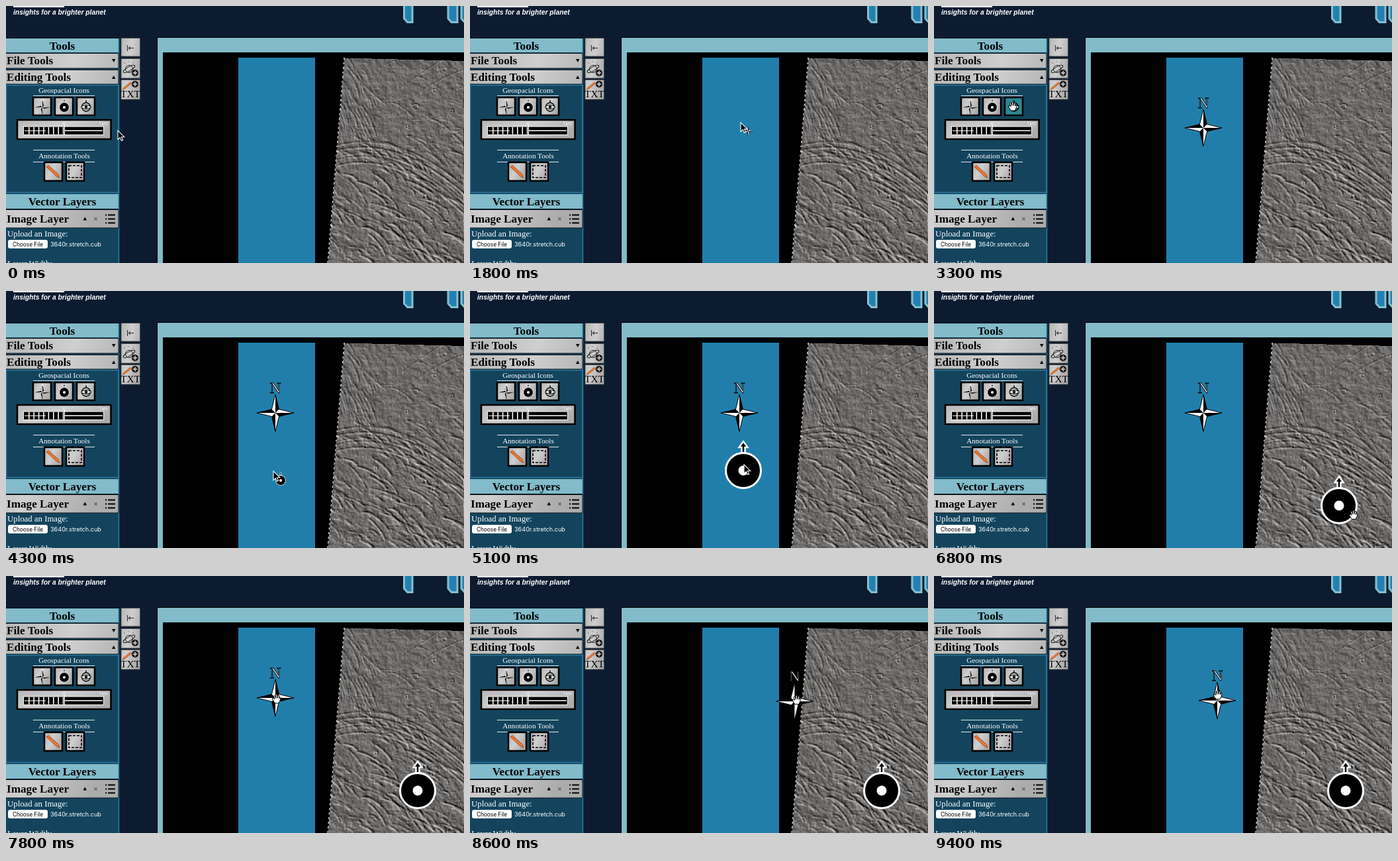
An HTML page with a canvas for the animation above (9.5 s loop, 692 px wide and 388 px high).

```html
<!DOCTYPE html>
<html lang="en">
<head>
<meta charset="utf-8">
<title>Map annotation demo</title>
<style>
  html, body { margin: 0; width: 100%; height: 100%; overflow: hidden; background: #0c1b30; }
  svg, canvas { position: absolute; left: 0; top: 0; }
  #land { left: 480px; top: 78px; }
  text { font: 11.2px "Liberation Serif", Times, serif; fill: #fff; }
  .head { font-weight: bold; font-size: 17.2px; fill: #000; }
  .mid { text-anchor: middle; }
  .form { font-size: 12.8px; }
  .sans { font: 9.1px Inter, "Liberation Sans", sans-serif; }
  .tag { font: italic bold 10.3px "Liberation Sans", Arial, sans-serif; }
  .bar { fill: url(#steel); stroke: #10161c; }
  .btn { fill: url(#steel); stroke: #000; stroke-width: 2.5; }
  .btn.on { fill: #2b8793; }
  .side { fill: url(#steel); stroke: #4d4d4d; }
</style>
</head>
<body>
<svg width="692" height="388">
  <defs>
    <linearGradient id="steel" x2="1" y2=".5">
      <stop stop-color="#b6b6b6"/><stop offset=".5" stop-color="#cfcfcf"/><stop offset="1" stop-color="#acacac"/>
    </linearGradient>
    <g id="star">
      <path d="M0-28L5.5-5.5 28 0 5.5 5.5 0 28-5.5 5.5-28 0-5.5-5.5z" fill="#fff" stroke="#000"/>
      <path d="M0 0V-28L5.5-5.5zH28L5.5 5.5zV28L-5.5 5.5zH-28L-5.5-5.5z"/>
    </g>
    <g id="north">
      <path d="M-2.5-26V-35H-6.5L0-44 6.5-35H2.5V-26z" stroke="#fff" stroke-width="2.4"/>
      <circle r="26.5" stroke="#fff" stroke-width="3"/>
      <circle r="7.5" fill="#fff"/>
    </g>
    <g id="plus">
      <circle r="5"/><path d="M-3.5 0H3.5M0-3.5V3.5" stroke="#ddd" stroke-width="1.5"/>
    </g>
    <path id="pencil" d="M-10-7L-7-9.500 8 4 10 9.500 5 7z" fill="#e8772e" stroke="#8a4a22" stroke-width=".8"/>
  </defs>

  <!-- banner -->
  <path d="M11-75h77v77h-77z" fill="#fff"/>
  <text class="tag" x="11" y="12.5">insights for a brighter planet</text>
  <g fill="#2481ae" stroke="#86c0d0" stroke-width="3">
    <path d="M601.500-3V19L606.500 24.500H614V-3zM668-3V19L673 24.500H682V-3zM688-3V19L693 24.500H700V-3z"/>
  </g>

  <!-- map frame -->
  <path d="M228 47H692V388H228z" fill="#000"/>
  <path d="M229 48H692V70H237V388H229z" fill="#82bbca"/>
  <path d="M351 78H467V388H351z" fill="#217eab"/>

  <!-- side panel -->
  <path d="M0 47H171V388H0z" fill="#14445d"/>
  <path d="M0 48H171M0 306.500H171" stroke="#081522" stroke-width="2"/>
  <path d="M0 49H170V70H0zM0 284H170V306H0z" fill="#82bbca"/>
  <path d="M.5 119.500H170V281.500H.5zM170.500 49V388" fill="none" stroke="#287ca2" stroke-width="1.5"/>
  <path class="bar" d="M-1 71.500H170V94H-1zM-1 96.500H170V118H-1zM-1 307.500H170V335H-1z"/>
  <text class="head mid" x="85" y="66">Tools</text>
  <text class="head" x="1" y="88">File Tools</text>
  <text class="head" x="1" y="113">Editing Tools</text>
  <text class="head mid" x="85" y="301">Vector Layers</text>
  <text class="head" x="1" y="327">Image Layer</text>
  <path d="M160 80H165.500L162.750 85zM160 110H165.500L162.750 105zM116.500 323.500H122L119.250 318.500z"/>
  <path d="M133.500 319.500l4 4m0-4l-4 4" stroke="#222"/>
  <path d="M154 315.500h11m-11 6h11m-11 6h11M150 315.500h2m-2 6h2m-2 6h2" stroke="#000" stroke-width="2"/>

  <text class="mid" x="87.500" y="131">Geospacial Icons</text>
  <path d="M41 135.500H134M41 217.500H134M41 235.500H134" stroke="#dfe9ee"/>
  <text class="mid" x="88" y="230">Annotation Tools</text>

  <g id="buttons">
    <rect class="btn" x="41" y="138" width="27" height="27"/>
    <rect class="btn" x="74" y="138" width="27" height="27"/>
    <rect class="btn" x="107" y="138" width="27" height="27"/>
  </g>
  <use href="#star" transform="translate(55 153) scale(.36)"/>
  <text class="mid" x="55" y="144" style="font-size:6px">N</text>
  <use href="#north" transform="translate(88 153) scale(.28)"/>
  <g transform="translate(121 152.500)">
    <circle r="6.500" fill="none" stroke="#000" stroke-width="1.400"/>
    <path d="M-8 0Q0-6 8 0 0 6-8 0z" fill="#fff" stroke="#000"/>
    <circle r="2.200"/><path d="M0-7V-10" stroke="#000" stroke-width="1.500"/>
  </g>

  <rect class="btn" x="17" y="172" width="141.500" height="29"/>
  <path d="M26.500 182H147.500V194.500H26.500z" stroke="#fff"/>
  <path d="M88 188.300H146" stroke="#fff" stroke-width="1.500"/>
  <path d="M28 188.300H60" stroke="#fff"/>
  <path d="M34 188.200H88" stroke="#fff" stroke-width="11" stroke-dasharray="1.600 5.800"/>
  <path d="M88.500 180V195" stroke="#fff"/>
  <text class="sans mid" x="88" y="180" style="font-size:6px">0</text>
  <text class="sans mid" x="147" y="180" style="font-size:6px">1 km</text>

  <rect class="btn" x="58" y="236" width="27" height="28"/>
  <rect class="btn" x="91" y="236" width="27" height="28"/>
  <use href="#pencil" x="71" y="250"/>
  <path d="M95 241H114V259H95z" fill="none" stroke="#000" stroke-width="1.600" stroke-dasharray="4 2"/>

  <text class="form" x="2" y="348">Upload an Image:</text>
  <rect x="3" y="353" width="60" height="13" rx="3" fill="#fff"/>
  <text class="sans mid" x="33" y="362.700" style="font-size:8.3px;fill:#000">Choose File</text>
  <text class="sans" x="67" y="362.700">3640r.stretch.cub</text>
  <text class="form" x="2" y="393">Layer Width:</text>

  <!-- side buttons -->
  <path class="side" d="M174 48.500H202.500V76H174zM174 79.500H202.500V109H174zM174 111.500H202.500V141H174z"/>
  <path d="M183.500 59V68M193 63.500H185M188 61L185 63.500 188 66" fill="none" stroke="#222"/>
  <g fill="none" stroke="#222">
    <circle cx="186" cy="95" r="5.500"/>
    <ellipse cx="186" cy="95" rx="10" ry="3" transform="rotate(-30 186 95)"/>
    <path d="M178 86h2m4-2h2m5 2h2" stroke="#777"/>
  </g>
  <use href="#plus" x="195" y="101"/>
  <use href="#pencil" transform="translate(183 121) scale(-.7 .6)"/>
  <use href="#plus" x="195" y="118"/>
  <text class="mid" x="188" y="138" style="font-size:15.500px;fill:#000">TXT</text>
</svg>

<canvas id="land" width="212" height="310"></canvas>

<svg width="692" height="388">
  <g id="rose">
    <use href="#star"/>
    <text class="mid" y="-30" style="font-size:23px;stroke:#000;stroke-width:.8">N</text>
  </g>
  <use id="dial" href="#north"/>
  <use id="starGhost" href="#star"/>
  <use id="dialGhost" href="#north"/>
  <path id="arrow" d="M0 0V12.500L3 9.800 5 14.200 7 13.300 5.100 9H9z" stroke="#fff"/>
  <path id="hand" d="M-6-1q1.500-1.500 3 1l-1.500-5q1-1.600 2.200 0l1 3.500-.2-5q1.200-1.600 2.200 0l.4 4.800.9-4q1.400-1.200 2 .3l-.5 4.500 1-2q1.400-.6 1.500.8-.6 4.400-2.800 8.100h-6q-2-3-4-7z" fill="#fff" stroke="#000"/>
</svg>

<script>
const $ = id => document.getElementById(id);
const lerp = (a, b, k) => a + (b - a) * k;

// Terrain: strokes and craters form a height map, which is then lit from one side.
function drawLand() {
  const cv = $('land'), W = cv.width, H = cv.height;
  const c = cv.getContext('2d', { willReadFrequently: true });
  const hash = (i, j) => {
    const s = Math.sin(i * 127.1 + j * 311.7) * 43758.5453;
    return s - Math.floor(s);
  };
  const noise = (x, y) => {
    const i = Math.floor(x), j = Math.floor(y);
    const ease = k => k * k * (3 - 2 * k), u = ease(x - i), v = ease(y - j);
    return lerp(lerp(hash(i, j), hash(i + 1, j), u), lerp(hash(i, j + 1), hash(i + 1, j + 1), u), v);
  };
  let seed = 0;
  const rnd = () => hash(++seed, 7);
  const curve = (x0, y0, x1, y1, x2, y2, w, a) => {
    c.lineWidth = w;
    c.strokeStyle = `rgba(255,255,255,${a})`;
    c.beginPath();
    c.moveTo(x0, y0);
    c.quadraticCurveTo(x1, y1, x2, y2);
    c.stroke();
  };
  const groove = (x, y, ang, len, w, a) => {
    const dx = Math.cos(ang) * len, dy = Math.sin(ang) * len;
    curve(x, y, x + dx / 2 + 4, y + dy / 2 - 4, x + dx, y + dy, w, a);
  };
  const crater = (x, y, r) => {
    c.beginPath();
    c.arc(x, y, r, 0, 7);
    c.fillStyle = '#000';
    c.fill();
    c.lineWidth = 1.3;
    c.strokeStyle = 'rgba(255,255,255,.5)';
    c.stroke();
  };

  c.fillStyle = '#333';
  c.fillRect(0, 0, W, H);
  c.filter = 'blur(.6px)';
  // fine steep grooves in the upper left, mixed ones beside them, broad ridges below
  for (let k = 0; k < 45; k++)
    groove(15 + rnd() * 50, rnd() * 110, 1 + rnd() * .3, 20 + rnd() * 35, 1.3, .2 + rnd() * .3);
  for (let k = 0; k < 40; k++)
    groove(50 + rnd() * 160, rnd() * 120, rnd() * 1.8 - .9, 10 + rnd() * 30, 1.5, .15 + rnd() * .25);
  for (let k = 0; k < 170; k++)
    groove(rnd() * W - 15, 115 + rnd() * 195, .35 + rnd() * .6, 12 + rnd() * 35, 1.5 + rnd() * 2, .2 + rnd() * .45);
  for (let k = 0; k < 5; k++) {
    const d = k * 8 + rnd() * 7;
    curve(15, 130 + d, 110, 100 + d, 220, 195 + d * 1.4, 1.5 + rnd() * 2, .3 + rnd() * .3);
  }
  curve(60, 96, 110, 45, 185, 0, 2, .5);
  curve(100, 90, 150, 40, 212, 18, 2, .5);
  curve(35, 12, 60, 45, 95, 72, 2, .5);
  crater(139, 74, 4);
  crater(183, 18, 3);
  crater(168, 50, 2.5);
  for (let k = 0; k < 25; k++) crater(rnd() * W, rnd() * H, 1 + rnd() * 1.5);
  c.filter = 'none';

  const img = c.getImageData(0, 0, W, H), relief = new Float32Array(W * H);
  for (let y = 0; y < H; y++) for (let x = 0; x < W; x++)
    relief[y * W + x] = img.data[(y * W + x) * 4] / 255 + .35 * noise(x / 2.5, y / 2.5)
      + .5 * noise(x / 6, y / 6) + .6 * noise(x / 14, y / 14);
  for (let y = 0; y < H; y++) for (let x = 0; x < W; x++) {
    const p = y * W + x;
    const slope = (relief[p - W + 1] ?? relief[p]) - (relief[p + W - 1] ?? relief[p]);
    const v = Math.max(20, Math.min(215, 105 + slope * (85 + y * .1)));
    const inside = x >= 31 - 25 * y / H && y >= (x - 31) * .025;
    img.data.set([v + 1, v, v - 2, inside ? 255 : 0], p * 4);
  }
  c.putImageData(img, 0, 0);
  c.setLineDash([3, 4]);
  curve(31, 0, 18.5, H / 2, 6, H, 1.3, .85);
}

// Each track lists [time, x, y].
const pointer = [
  [100, 169, 188], [700, 56, 152], [1000, 56, 152], [1200, 105, 158], [1800, 409, 176],
  [2400, 409, 176], [3200, 122, 152], [3300, 119, 152], [3500, 90, 152], [3700, 90, 152],
  [4300, 404, 272], [4800, 414, 262], [5500, 414, 262], [5700, 417, 273], [5900, 428, 274],
  [6300, 566, 284], [6700, 628, 332], [6900, 640, 345], [7100, 640, 345], [7700, 414, 188],
  [7800, 409, 186], [7900, 412, 186], [8400, 514, 190], [8900, 463, 184], [9400, 429, 180]
];
const rosePath = [[7900, 407, 184], [8400, 510, 190], [8900, 461, 188], [9400, 428, 188]];
const dialPath = [[5800, 413, 271], [6300, 527, 281], [6800, 612, 324], [6900, 622, 324]];

function at(track, t) {
  const n = track.findIndex(k => k[0] > t);
  if (n < 1) return (n ? track.at(-1) : track[0]).slice(1);
  const a = track[n - 1], b = track[n], k = (t - a[0]) / (b[0] - a[0]);
  return [lerp(a[1], b[1], k), lerp(a[2], b[2], k)];
}

function place(id, shown, x, y, scale = 1) {
  $(id).setAttribute('display', shown ? 'inline' : 'none');
  $(id).setAttribute('transform', `translate(${x} ${y}) scale(${scale})`);
}

const buttons = [...$('buttons').children];

function frame(now) {
  const t = Math.floor(now % 9500 / 100) * 100;
  const [x, y] = at(pointer, t);
  let hover = false;
  buttons.forEach((b, i) => {
    const on = Math.abs(x - 54.5 - 33 * i) < 14 && Math.abs(y - 152) < 14;
    b.classList.toggle('on', on);
    hover ||= on;
  });
  const hand = hover || t >= 5700 && t < 7100 || t >= 7700;
  place('rose', t >= 2100, ...at(rosePath, t));
  place('dial', t >= 4800, ...at(dialPath, t));
  place('starGhost', t >= 1000 && t < 2100, x + 11, y + 13, .28);
  place('dialGhost', t >= 3700 && t < 4800, x + 11, y + 14, .28);
  place('arrow', !hand, x, y, 1.08);
  place('hand', hand, x, y);
  requestAnimationFrame(frame);
}

drawLand();
requestAnimationFrame(frame);
</script>
</body>
</html>
```
